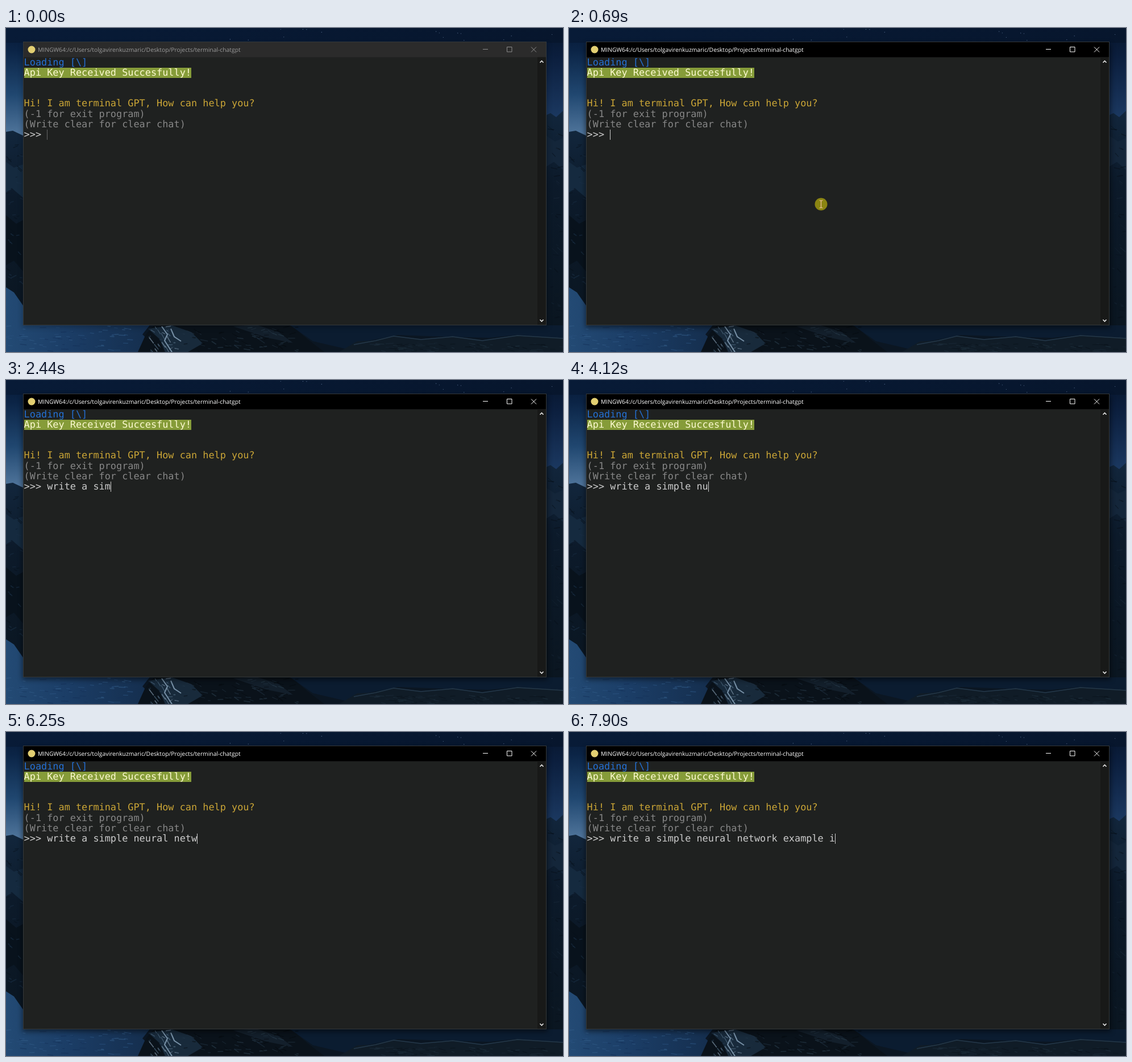
Recreate the animation shown at these times as an HTML page. Size 980 px wide and 571 px high, loop 8000 ms.

```html
<!DOCTYPE html>
<html lang="en">
<head>
<meta charset="utf-8">
<title>Terminal</title>
<style>
html, body { margin: 0; width: 100%; height: 100%; overflow: hidden; background: #0a1a33; }
svg { display: block; width: 980px; height: 571px; }
text { white-space: pre; text-rendering: geometricPrecision; }
.mono { font: 16.86px "DejaVu Sans Mono", "Noto Sans Mono", monospace; }
.title { font: 10.33px "Open Sans", "Noto Sans", sans-serif; }
</style>
</head>
<body>
<svg viewBox="0 0 980 571" xmlns="http://www.w3.org/2000/svg">
  <defs>
    <linearGradient id="west" x2="0" y2="1">
      <stop offset="0" stop-color="#081a35"/>
      <stop offset=".2" stop-color="#0b2446"/>
      <stop offset=".6" stop-color="#204770"/>
      <stop offset="1" stop-color="#557aa0"/>
    </linearGradient>
    <linearGradient id="east" x2="0" y2="1">
      <stop offset="0" stop-color="#07162d"/>
      <stop offset=".3" stop-color="#0b1e3d"/>
      <stop offset="1" stop-color="#1c3a63"/>
    </linearGradient>
    <linearGradient id="top" x2="1" y2="0">
      <stop offset="0" stop-color="#081b37"/>
      <stop offset="1" stop-color="#07162d"/>
    </linearGradient>
    <linearGradient id="hill" x2="0" y2="1">
      <stop offset="0" stop-color="#12263c"/>
      <stop offset=".3" stop-color="#0c1a2a"/>
      <stop offset="1" stop-color="#0a151f"/>
    </linearGradient>
    <linearGradient id="sea" x2="1" y2="0">
      <stop offset="0" stop-color="#234a74"/>
      <stop offset=".4" stop-color="#1b3d66"/>
      <stop offset="1" stop-color="#142c4a"/>
    </linearGradient>
    <filter id="blur" x="-10%" y="-10%" width="120%" height="120%"><feGaussianBlur stdDeviation="5"/></filter>
  </defs>

  <rect width="980" height="571" fill="#0b1622"/>
  <rect width="40" height="195" fill="url(#west)"/>
  <rect x="940" width="40" height="165" fill="url(#east)"/>
  <rect width="980" height="26" fill="url(#top)"/>
  <path d="M0 183L12 181 31 190V571H0Z" fill="url(#hill)"/>
  <path d="M0 236L14 246 31 240V300L10 282 0 290Z" fill="#152a3f"/>
  <path d="M0 330L18 345 31 338V430L14 410 0 418Z" fill="#08121c"/>
  <path d="M945 156L958 150 968 157 980 146V571H945Z" fill="url(#hill)"/>
  <path d="M951 190L966 200 980 194V250L964 236 951 244Z" fill="#14263a"/>
  <path d="M0 457L14 466 32 492V521H255L240 540 272 571H0Z" fill="url(#sea)"/>
  <path d="M232 571L246 540 262 522 500 522 530 548 560 571Z" fill="#0a121a"/>
  <path d="M250 530L292 524 326 536 346 556 320 571 280 571 270 548Z" fill="#182a3b"/>
  <path d="M400 526L440 523 480 536 505 555 460 546Z" fill="#131f2b"/>
  <path d="M500 524H980V549L900 541 850 546 770 544 690 541 640 551 600 566 540 552Z" fill="#0b1c30"/>
  <path d="M586 571L618 552 650 551 682 542 730 548 786 543 838 550 900 541 980 546V571Z" fill="#101c27"/>
  <path d="M612 558L650 551 682 543 730 549 786 544 838 551 900 542 980 547" fill="none" stroke="#24384a" stroke-width="1.5"/>
  <g id="texture" fill="none" stroke-linecap="round"></g>
  <path d="M274 526L284 540 279 551 292 571M290 530L296 544 308 552" fill="none" stroke="#7790a6" stroke-width="2"/>

  <rect id="shadow" x="29" y="28" width="924" height="500" fill="#000" filter="url(#blur)"/>
  <rect x="30.5" y="24.5" width="920" height="499" fill="#1f2120" stroke="#34383a"/>
  <rect id="bar" x="31" y="25" width="919" height="26.5"/>
  <rect x="935" y="51.5" width="15" height="471.5" fill="#181918"/>
  <circle cx="45" cy="38" r="6.5" fill="#e3cf72"/>
  <g id="chrome">
    <text class="title" x="56" y="42">MINGW64:/c/Users/tolgavirenkuzmaric/Desktop/Projects/terminal-chatgpt</text>
    <path d="M839 37.5H848M881.5 33.5H890V42H881.5ZM924 33.5L933 42.5M933 33.5L924 42.5" fill="none" stroke="currentColor"/>
  </g>
  <path d="M939.5 61L942.5 58 945.5 61M939.5 514L942.5 517 945.5 514" fill="none" stroke="#e8e8e8" stroke-width="1.6"/>

  <rect x="32" y="70" width="294" height="18" fill="#869c39"/>
  <g id="lines" class="mono"></g>
  <rect id="caret" y="179" width="1" height="18"/>
  <g id="mouse">
    <circle id="press" r="11" fill="#8b8512"/>
    <path id="beam" d="M-3 -6.5H-1L0 -5.5 1 -6.5H3M0 -5.5V5.5M-3 6.5H-1L0 5.5 1 6.5H3" fill="none" stroke-width="1.2"/>
  </g>
</svg>
<script>
const LOOP = 8000, LEFT = 31.62, CELL = 10.15, ROW = 18.12;
const $ = id => document.getElementById(id);

function add(parent, tag, attrs) {
  const el = document.createElementNS("http://www.w3.org/2000/svg", tag);
  for (const k in attrs) el.setAttribute(k, attrs[k]);
  return parent.appendChild(el);
}

function line(row, text, fill) {
  const el = add($("lines"), "text", { x: LEFT, y: 66 + row * ROW, fill });
  el.textContent = text;
  return el;
}

line(0, "Loading [\\]", "#2470d4");
line(1, "Api Key Received Succesfully!", "#fcfad0");
line(4, "Hi! I am terminal GPT, How can help you?", "#cba636");
line(5, "(-1 for exit program)", "#878787");
line(6, "(Write clear for clear chat)", "#878787");
const prompt = line(7, ">>> ", "#cccccc");

// Landscape detail
let seed = 11;
const rand = () => (seed = seed * 16807 % 2147483647) / 2147483647;

function strokes(n, [x, y, w, h], dx, dy, colors) {
  for (let i = 0; i < n; i++) {
    const px = x + rand() * w, py = y + rand() * h, s = .3 + rand();
    const d = `M${px.toFixed(1)} ${py.toFixed(1)}l${(dx * s).toFixed(1)} ${(dy * s * (rand() - .3)).toFixed(1)}`;
    add($("texture"), "path", { d, stroke: colors[i % colors.length], "stroke-width": .8 + rand(), opacity: .6 });
  }
}
strokes(70, [0, 525, 225, 44], 9, 2, ["#2b5480", "#15325a", "#335d88"]);
strokes(30, [250, 526, 50, 44], 6, 16, ["#5c7890", "#8ba2b5", "#2b4258"]);
strokes(70, [300, 526, 215, 44], 10, 12, ["#1f303f", "#060b11", "#2a3d4d"]);
strokes(80, [630, 555, 345, 16], 12, 6, ["#1a2a38", "#0a131b", "#1f3240"]);
strokes(35, [0, 200, 26, 250], 8, 14, ["#1a3046", "#08121d"]);
strokes(35, [953, 170, 22, 380], 8, 14, ["#172737", "#08111a"]);
for (let i = 0; i < 16; i++)
  add($("texture"), "circle", { cx: 330 + rand() * 640, cy: 2 + rand() * 20, r: .6, fill: "#5b7294" });

// Bursts of keys: first time, last time, keys ("<" deletes)
const bursts = [
  [930, 1010, "wr"], [1390, 1900, "ite a "], [2060, 2060, "s"], [2210, 2210, "i"],
  [2440, 2440, "m"], [2670, 3050, "ple "], [3250, 3250, "n"], [3510, 3580, "ur"],
  [4120, 4220, "<e"], [4580, 4780, "<<e"], [5000, 5130, "ura"], [5300, 5400, "l "],
  [5730, 5730, "n"], [5930, 5930, "e"], [6080, 6080, "t"], [6250, 6680, "work "],
  [7010, 7010, "e"], [7220, 7320, "xam"], [7550, 7550, "p"], [7710, 7900, "le i"]
];
const keys = bursts.flatMap(([from, to, text]) => [...text].map((key, i) =>
  ({ key, at: from + (to - from) * i / Math.max(1, text.length - 1) })));

function typed(t) {
  let s = "";
  for (const { key, at } of keys) {
    if (at > t) break;
    s = key === "<" ? s.slice(0, -1) : s + key;
  }
  return s;
}

function pointer(t) {
  if (t < 460) {
    const k = Math.min(2, Math.floor((t - 30) / 40)) / 2;
    return [720.5 - 57 * k, 446 - 49.5 * k];
  }
  const k = Math.min(4, Math.floor((t - 460) / 30) + 1) / 4;
  return [663.5 - 220 * k, 396.5 - 86 * k];
}

function draw(t) {
  const active = t >= 690, pressed = active && t < 850;
  $("bar").setAttribute("fill", active ? "#000" : "#2b2b2b");
  $("shadow").setAttribute("opacity", active ? .5 : .25);
  $("chrome").setAttribute("color", active ? "#fff" : "#8c8c8c");
  $("chrome").setAttribute("fill", active ? "#fff" : "#9b9b9b");

  const s = typed(t);
  prompt.textContent = ">>> " + s;
  $("caret").setAttribute("x", Math.round(LEFT + (4 + s.length) * CELL));
  $("caret").setAttribute("fill", active ? "#ccc" : "#666");

  const shown = t >= 30 && t < 930;
  $("mouse").setAttribute("visibility", shown ? "visible" : "hidden");
  if (shown) $("mouse").setAttribute("transform", `translate(${pointer(t)})`);
  $("press").setAttribute("opacity", pressed ? 1 : 0);
  $("beam").setAttribute("stroke", pressed ? "#f0c4a0" : "#c8c8c8");
}

const start = performance.now();
function tick() {
  draw((performance.now() - start) % LOOP);
  requestAnimationFrame(tick);
}
draw(0);
requestAnimationFrame(tick);
</script>
</body>
</html>
```
